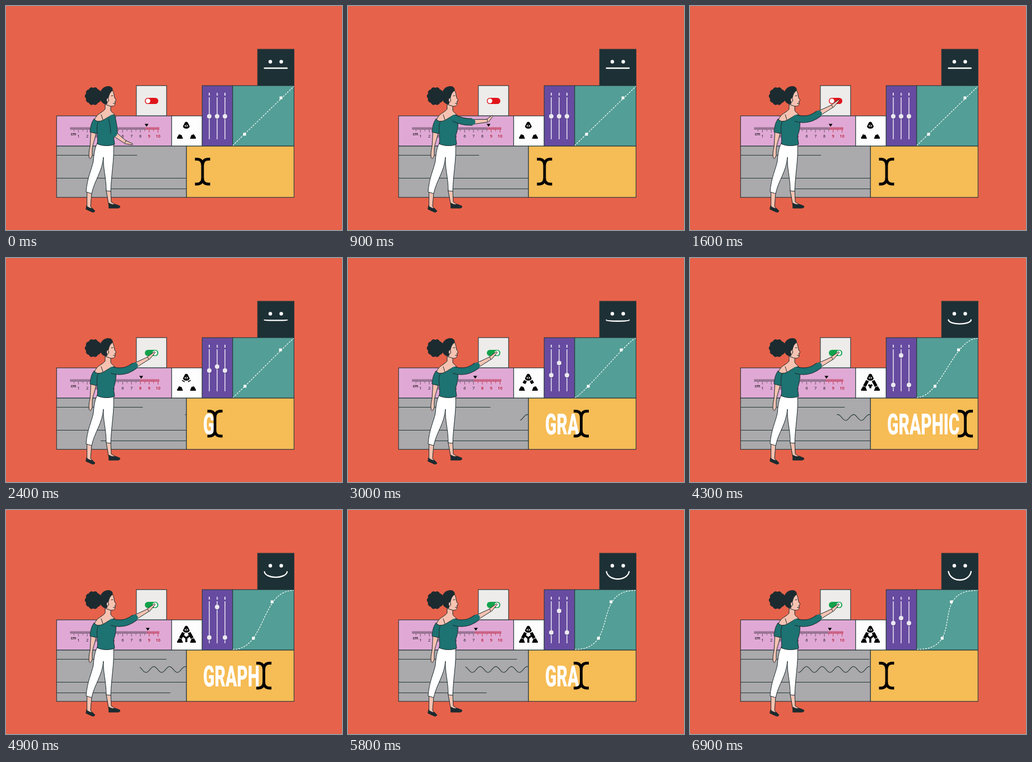
Write an HTML page that moves like this. It is 600 px wide and 400 px high and loops after 7000 ms.

```html
<!DOCTYPE html>
<html lang="en">
<head>
<meta charset="utf-8">
<title>Design blocks</title>
<style>
  html, body { margin: 0; width: 100%; height: 100%; overflow: hidden; background: #e7624a; }
  svg { display: block; width: 100vw; height: 100vh; }
  .line { fill: none; stroke: #24383c; stroke-width: 1.1; }
  .box { stroke: #24383c; stroke-width: 1.1; }
  .ink { stroke: #1d2b2f; stroke-width: 1; stroke-linejoin: round; stroke-linecap: round; }
  .skin { fill: #f6c3b2; }
  .teal { fill: #1d7272; }
  .dark { fill: #1c2b30; }
  .sleeve { fill: none; stroke-linecap: butt; }
  .tall { font-family: Roboto, Arial, sans-serif; font-weight: 900; fill: #fff; }
  .scale { font: 600 7.5px "Open Sans", Arial, sans-serif; text-anchor: middle; }
  .grow { fill: none; stroke: #000; }
</style>
</head>
<body>
<svg viewBox="0 0 600 400">
  <rect width="600" height="400" fill="#e7624a"/>
  <g class="box" transform="translate(.3 .2)">
    <rect x="449" y="77" width="65" height="65" fill="#1d3035"/>
    <rect x="232.500" y="142" width="54" height="54" fill="#edecea"/>
    <rect x="90" y="196" width="205.500" height="54" fill="#e0a9d5"/>
    <rect x="295.500" y="196" width="54.500" height="54" fill="#fdfdfd"/>
    <rect x="350" y="142" width="54.500" height="108" fill="#674ba1"/>
    <rect x="404.500" y="142" width="109.500" height="108" fill="#539e96"/>
    <rect x="90" y="250" width="232" height="91.500" fill="#aaa9ab"/>
    <rect x="322" y="250" width="192" height="91.500" fill="#f6bc55"/>
  </g>

  <!-- face -->
  <circle cx="472" cy="99.500" r="3.200" fill="#fff"/>
  <circle cx="491.500" cy="99.500" r="3.200" fill="#fff"/>
  <path id="mouth" fill="none" stroke="#fff" stroke-width="2.300" stroke-linecap="round"/>

  <!-- switch -->
  <rect id="pill" x="248" y="164" width="24" height="11" rx="5.500"/>
  <circle id="knob" cy="169.500" r="4.800" fill="#fff" stroke-width="1.200"/>

  <g id="ruler"><text class="scale" x="120.500" y="231" style="font-size:6.500px">cm</text></g>
  <path id="marker" d="M-3.500,210.500h7l-3.500,5z"/>

  <!-- assembling icon -->
  <path d="M319.500,208q2.500-2.500,5,0l3.500,7q-1,4-6,4t-6-4z"/>
  <path d="M318.500,214q3.500-3.500,7,0q-3.500,3.500-7,0z" fill="#fff"/>
  <circle cx="322" cy="214" r="1.200"/>
  <path d="M309,229l4.500,1.500l2.500,6.500h-10q-1.500-1,0-3zM335.500,229l-4.500,1.500l-2.500,6.500h10q1.500-1,0-3z"/>
  <path id="legs" class="grow" stroke-width="5.500"/>
  <path id="hub" class="grow" stroke-width="3.500"/>

  <g id="sliders"></g>

  <!-- curve -->
  <path id="curve" fill="none" stroke="#fff" stroke-width="1.200" stroke-dasharray="3 2"/>
  <rect id="low" y="226.500" width="5" height="5" fill="#fff"/>
  <rect id="high" y="161.500" width="5" height="5" fill="#fff"/>

  <!-- grey panel -->
  <path id="rules" class="line"/>
  <path id="wave" class="line"/>

  <!-- typed word -->
  <text id="word" class="tall" font-size="52" transform="translate(352 314.500) scale(.575 1)"></text>
  <path id="caret" d="M-13.500,273.500H-10Q0,273.500,0,285V307Q0,318-10,318H-13.500M13.500,273.500H10Q0,273.500,0,285V307Q0,318,10,318H13.500" fill="none" stroke="#000" stroke-width="4.800"/>

  <!-- woman -->
  <g class="ink">
    <path class="skin" d="M145,331L153,333L151,358L157,364L145,360ZM179,328L187,328L188,350L196,355L184,356Z"/>
    <path class="dark" d="M144,357Q149,362,154,361L159,366Q158,369,154,368L143,363ZM184,352Q190,356,195,354L203,357Q205,360,200,361H184Z"/>
    <path fill="#fff" d="M163,245L192,246C194,270,188,300,187,331L179,330C179,306,173,290,174,270C172,296,158,311,153,335L143,332C145,306,153,292,156,277C157,263,159,252,163,245Z"/>
    <path class="skin" d="M152,224L161,227C158,240,154,249,154,257L154,267Q151,275,148.500,271Q147,263,150,251Z"/>
    <path class="skin" d="M177,174L177,184C172,191,163,191,158,203L170,212L196,199C197,193,188,191,187,186V178Z"/>
    <path class="skin" d="M181,153L190,150C193,155,193,160,194,164L197,168.500L194.500,170L195,173C195,179,191,179,187,179L178,176Z"/>
    <path class="dark" d="M168,162C167,148,177,142,186,144Q191,146,190,151Q185,154,183,163L180,175Q169,175,168,162Z"/>
    <g id="bun" class="dark"></g>
    <ellipse class="skin" cx="181.500" cy="168" rx="2" ry="3.500"/>
    <path fill="none" d="M188,160.500l3-.5M191.500,174h3M170,194L173,203"/>
    <path class="teal" d="M157,202Q162,207,168,206C167,214,164,221,162,228L150,225C151,214,153,207,157,202Z"/>
    <path class="teal" d="M165,206C175,206,182,196,193,194C199,206,196,223,192,232L194,247C184,251,170,250,163,246C165,235,161,223,163,212Z"/>
    <path id="hand" class="skin"/>
    <path id="forearm" class="skin"/>
    <path id="cloth" class="sleeve" stroke-width="13"/>
    <path id="clothFill" class="sleeve" stroke-width="11" style="stroke:#1d7272;stroke-linecap:round"/>
  </g>
</svg>
<script>
const LOOP = 7000, START = 1800;
const $ = id => document.getElementById(id);
const set = (el, attrs) => { for (const k in attrs) el.setAttribute(k, attrs[k]); };
const add = (parent, tag, attrs) => {
  const el = document.createElementNS("http://www.w3.org/2000/svg", tag);
  set(el, attrs);
  return parent.appendChild(el);
};
const clamp = u => Math.max(0, Math.min(1, u));
const ease = u => (1 - Math.cos(Math.PI * clamp(u))) / 2;
const mix = (a, b, u) => a + (b - a) * u;

// Ruler: ten divisions per centimetre.
const CM = 15.8, ZERO = 113.5, marks = [];
for (let i = 1; i <= 101; i++) {
  const x = ZERO + i * CM / 10;
  const end = i % 10 == 0 ? 226 : i % 5 == 0 ? 223.5 : 221;
  marks.push({ x, prop: "stroke", el: add($("ruler"), "path", { d: `M${x},216.500V${end}`, "stroke-width": .75 }) });
  if (i % 10) continue;
  const label = add($("ruler"), "text", { x, y: 234.5, class: "scale" });
  label.textContent = i / 10;
  marks.push({ x, prop: "fill", el: label });
}

const knobs = [..."RGB"].map((name, i) => {
  const x = 363 + i * 14, g = $("sliders");
  add(g, "text", { class: "tall", "font-size": 7, "text-anchor": "middle", transform: `translate(${x} 160) scale(.575 1)` }).textContent = name;
  add(g, "path", { d: `M${x},163V238`, stroke: "#fff", "stroke-width": 1.3 });
  const knob = add(g, "g", {});
  add(knob, "circle", { cx: x + .5, cy: 1, r: 4.2, fill: "#3d2a6b", opacity: .5 });
  add(knob, "circle", { cx: x, r: 4, fill: "#eceaf0" });
  return knob;
});

// Curly bun: a ring of small curls around a core.
add($("bun"), "circle", { cx: 156, cy: 161, r: 12 });
for (let a = 0; a < 2 * Math.PI; a += Math.PI / 5)
  add($("bun"), "circle", { cx: 156 + 10 * Math.cos(a), cy: 161 + 11 * Math.sin(a), r: 4.8 });

// Tapered limb, left open at the end nearest the body.
function limb([x1, y1], [x2, y2], w1, w2) {
  const len = Math.hypot(x2 - x1, y2 - y1), nx = (y1 - y2) / len / 2, ny = (x2 - x1) / len / 2;
  return `M${x1 + nx * w1},${y1 + ny * w1}L${x2 + nx * w2},${y2 + ny * w2}` +
    `L${x2 - nx * w2},${y2 - ny * w2}L${x1 - nx * w1},${y1 - ny * w1}`;
}

// Elbow, cuff, wrist and fingertip for lowered, half raised and pointing.
const POSES = [
  [[193, 215], [193, 228], [213, 243], [226, 247]],
  [[206, 208], [222, 207], [249, 205], [258, 196]],
  [[211, 207], [230, 192], [254, 179], [266, 168]]
];
function drawArm(t) {
  const q = 2 * ease((t - 200) / 1400), i = q < 1 ? 0 : 1;
  const [elbow, cuff, wrist, tip] = POSES[i].map((p, j) => p.map((v, k) => mix(v, POSES[i + 1][j][k], q - i)));
  const d = `M189,200Q${elbow} ${cuff}`;
  set($("cloth"), { d });
  set($("clothFill"), { d });
  set($("forearm"), { d: limb(cuff, wrist, 8.5, 5) });
  set($("hand"), { d: limb(wrist, tip, 6, 2) });
}

function drawSwitch(on) {
  const color = on ? "#12a24b" : "#e0141a";
  set($("pill"), { fill: color });
  set($("knob"), { cx: on ? 266 : 253.5, stroke: color });
}

// The marker eases from one turning point to the next.
const TURNS = [[1700, 251], [3500, 222], [4800, 254], [5700, 228], [7000, 250]];
function drawRuler(t) {
  const i = Math.max(1, TURNS.findIndex(([time]) => time > t));
  const [[t0, a], [t1, b]] = [TURNS[i - 1], TURNS[i]];
  const x = mix(a, b, ease((t - t0) / (t1 - t0)));
  set($("marker"), { transform: `translate(${x})` });
  for (const m of marks) m.el.setAttribute(m.prop, m.x > x - 2 ? "#b5162b" : "#4a3a4c");
}

function drawSliders(t) {
  const swing = t < 1700 ? 0 : Math.sin(Math.PI * (t - 1700) / 6000) ** 2;
  knobs.forEach((k, i) => set(k, { transform: `translate(0 ${197 + swing * (i == 1 ? -24 : 31)})` }));
}

function drawCurve(p) {
  const bend = .84 * p, a = 426 + 29 * bend, b = 491 - 29 * bend;
  set($("curve"), { d: `M405,249C${405 + 109 * bend},249 ${514 - 109 * bend},143.500 514,143.500` });
  set($("low"), { x: a - 2.5 });
  set($("high"), { x: b - 2.5 });
}

// Strokes mirrored about the icon's axis, grown to the fraction u.
function grow(id, u, strokes) {
  let d = "";
  for (const [x1, y1, x2, y2] of strokes)
    for (const side of [-1, 1])
      d += `M${322 + side * x1},${y1}L${322 + side * mix(x1, x2, u)},${mix(y1, y2, u)}`;
  set($(id), { d: u > 0 ? d : "" });
}
function drawIcon(p) {
  grow("legs", clamp(p * 4), [[5, 219, 10.5, 229]]);
  grow("hub", clamp((p - .2) * 2), [[0, 229, 6, 224], [0, 227, 0, 237]]);
}

function drawRules(u, p) {
  const left = 187 - 239 * u ** 1.2;
  set($("rules"), { d: `M90,266.500H${234 + 88 * u}M90,307.500H322M${Math.max(90, left)},326.500H${Math.min(322, left + 235)}` });

  const points = [];
  for (let x = 324 - 131 * p; x < 322; x++)
    points.push(`${x},${284.8 - 5.2 * Math.cos((x - 236) / 28 * 2 * Math.PI)}`);
  set($("wave"), { d: points.length ? "M" + points.join("L") : "" });
}

function drawWord(t) {
  const typed = Math.ceil((t - 2300) / 330), left = 7 - Math.max(0, Math.ceil((t - 4500) / 350));
  const word = $("word");
  word.textContent = "GRAPHIC".slice(0, Math.max(0, Math.min(typed, left)));
  const width = word.textContent ? word.getComputedTextLength() : 0;
  set($("caret"), { transform: `translate(${351 + width * .625})` });
}

function drawMouth(p) {
  const y = 111 - p, sag = y + 20 * p;
  set($("mouth"), { d: `M461.500,${y}C${461.5 + 4 * p},${sag} ${502 - 4 * p},${sag} 502,${y}` });
}

function frame() {
  const t = performance.now() % LOOP;
  const u = clamp((t - START) / (LOOP - START)), p = ease(u);
  drawArm(t);
  drawSwitch(t >= 1650);
  drawRuler(t);
  drawSliders(t);
  drawCurve(p);
  drawIcon(p);
  drawRules(u, p);
  drawWord(t);
  drawMouth(p);
  requestAnimationFrame(frame);
}
frame();
</script>
</body>
</html>
```
